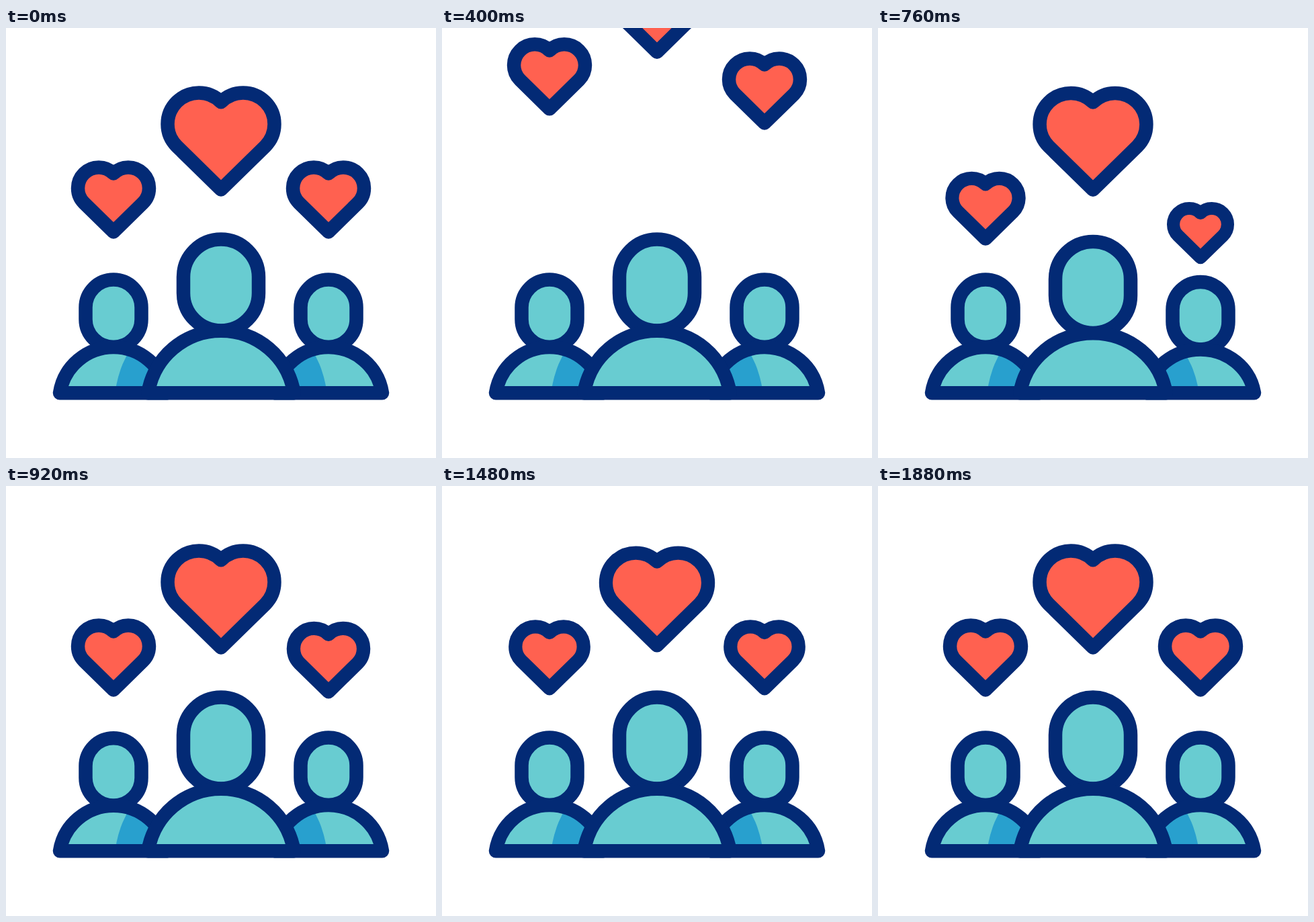
An HTML page without scripts for the animation above (2 s loop, 640x640 px).

```html
<!DOCTYPE html>
<html lang="en">
<head>
<meta charset="utf-8">
<title>People sharing hearts</title>
<style>
  @property --t { syntax: "<number>"; inherits: true; initial-value: 0; }

  html, body { margin: 0; width: 100%; height: 100%; overflow: hidden; background: #fff; }

  /* --t is the clock in ms, ticking 25 times a second; all poses follow from it */
  svg {
    display: block; width: 100%; height: 100%;
    animation: clock 2s steps(50) -1ms infinite;
    --beat: calc(.052 * sin(clamp(0, (var(--t) - 1300) / 520, 1) * 1turn));
  }
  @keyframes clock { from { --t: 0; } to { --t: 2000; } }

  .line {
    stroke: #032a75; stroke-width: var(--w, 20.5px); stroke-linejoin: round;
    vector-effect: non-scaling-stroke;
  }
  .skin { fill: #68ccd1; }
  .shade { fill: #28a0ce; }
  .heart { fill: #ff6150; }

  /* old hearts fly off */
  .fly { transform: translateY(calc(max(0, var(--t) - var(--go)) * -.64px)); }
  .fly use { transform: scale(var(--z)); }

  /* new hearts grow out of the heads, then beat once */
  .rise {
    --q: calc(1 - clamp(0, (var(--t) - var(--go)) / var(--span), 1));
    --left: calc(var(--q) * var(--q) * (1 + var(--q)) / 2);
    --s: calc(1 - var(--left) - var(--beat));
    --w: calc(14.8px + 5.7px * var(--s));
    opacity: clamp(0, (var(--t) - var(--fade)) / 100, 1);
    transform: translateY(calc(var(--left) * var(--from) * 1px));
  }
  .rise use { transform: scale(calc(var(--z) * var(--s))); }

  .big { --z: 1; --from: 283; }
  .small { --z: .6667; --from: 210; }

  /* damped hop: heads travel, bodies stretch from the base line */
  .person {
    --u: clamp(0, (var(--t) - var(--go)) / var(--span), 1);
    --y: calc(var(--amp) * -1 * sin(var(--u) * 1turn) * (1 - var(--u)) * (1 - var(--damp) * var(--u)));
  }
  .head { transform: translateY(calc(var(--y) * 1px)); }
  .body { transform: scaleY(calc(1 - var(--y) / var(--h))); }
</style>
</head>
<body>
<svg viewBox="0 0 640 640">
  <defs>
    <path id="heart" class="heart line" d="M0 72L-65.9 7.4A46.5 46.5 0 0 1 0 -58.3A46.5 46.5 0 0 1 65.9 7.4Z"/>
    <path id="torso" d="M-80 0A81 81 0 0 1 80 0Z"/>
    <clipPath id="inside"><use href="#torso"/></clipPath>
    <g id="side">
      <rect class="head skin line" x="-41.5" y="-168.75" width="83" height="100.5" rx="41.5"/>
      <g class="body" style="--h: 68">
        <use href="#torso" class="skin"/>
        <g clip-path="url(#inside)"><circle class="shade" cx="160" cy="17.75" r="158.5"/></g>
        <path class="line" fill="none" d="M-80 0A81 81 0 0 1 80 0Z"/>
      </g>
    </g>
  </defs>

  <g transform="translate(320 168.5)">
    <g class="fly big" style="--go: 80"><use href="#heart"/></g>
    <g class="rise big" style="--go: 445; --span: 330; --fade: 525"><use href="#heart"/></g>
  </g>
  <g transform="translate(160 255.4)">
    <g class="fly small" style="--go: 114"><use href="#heart"/></g>
    <g class="rise small" style="--go: 471; --span: 420; --fade: 525"><use href="#heart"/></g>
  </g>
  <g transform="translate(480 255.4)">
    <g class="fly small" style="--go: 147"><use href="#heart"/></g>
    <g class="rise small" style="--go: 572; --span: 420; --fade: 600"><use href="#heart"/></g>
  </g>

  <g transform="translate(160 543.25)">
    <g class="person" style="--go: 500; --span: 520; --amp: 21; --damp: 1"><use href="#side"/></g>
  </g>
  <g transform="translate(480 543.25) scale(-1 1)">
    <g class="person" style="--go: 440; --span: 480; --amp: 12; --damp: 0"><use href="#side"/></g>
  </g>
  <g transform="translate(320 543.25)">
    <g class="person" style="--go: 440; --span: 480; --amp: 35.6; --damp: 1">
      <rect class="head skin line" x="-56" y="-228.75" width="112" height="136" rx="56"/>
      <g class="body" style="--h: 92.75">
        <path class="skin line" d="M-108.6 0A110 110 0 0 1 108.6 0Z"/>
      </g>
    </g>
  </g>
</svg>
</body>
</html>
```
